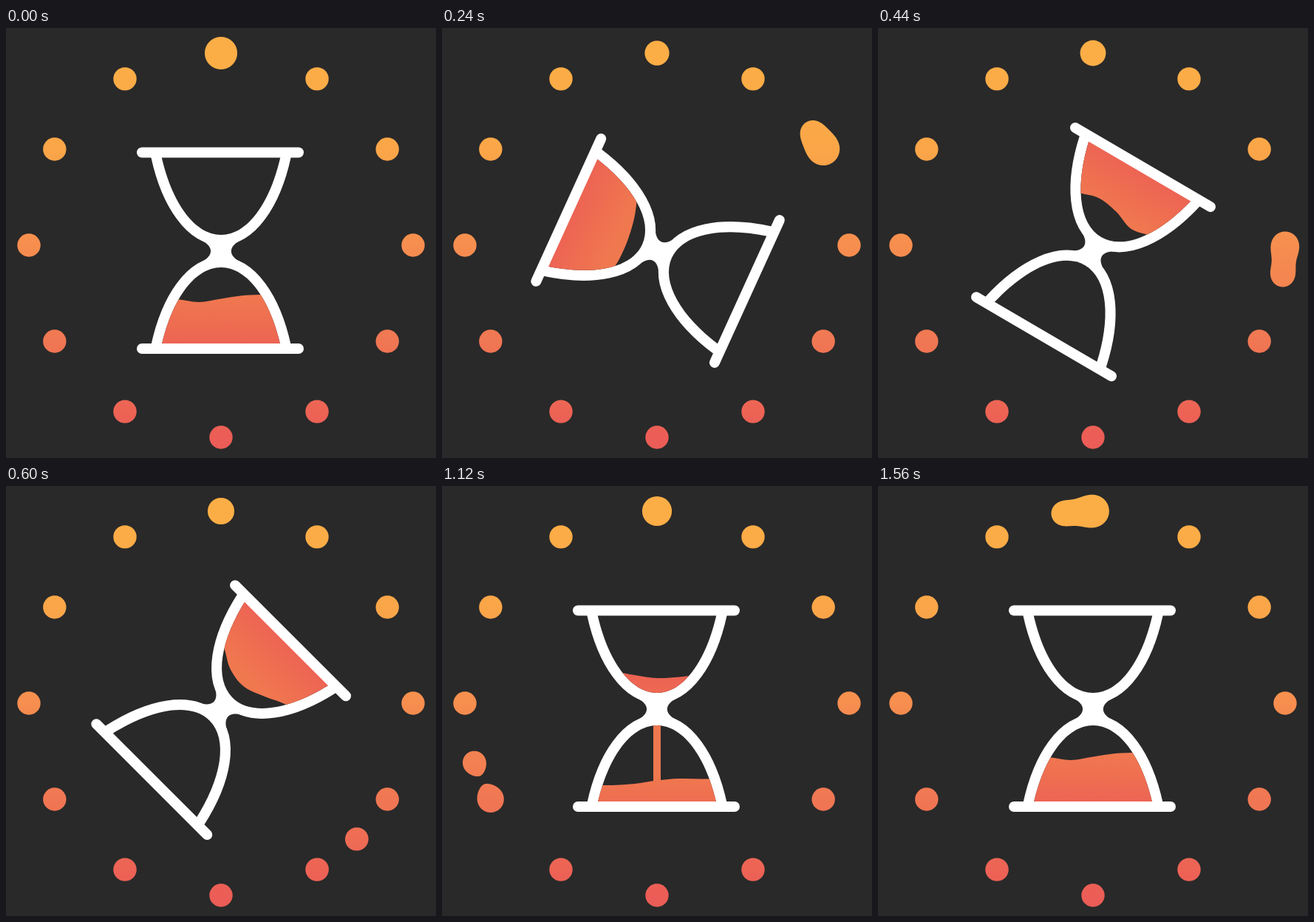
An HTML page with a canvas that plays this animation: 582 px wide and 582 px high, repeating every 1600 ms.

```html
<!DOCTYPE html>
<html lang="en">
<head>
<meta charset="utf-8">
<title>Hourglass loader</title>
<style>
  html, body { margin: 0; width: 100%; height: 100%; overflow: hidden; background: #292929; }
  canvas { display: block; width: 582px; height: 582px; }
</style>
</head>
<body>
<canvas id="stage" width="582" height="582"></canvas>
<script>
const ctx = document.getElementById('stage').getContext('2d');
const LOOP = 1600, TICK = 40, BG = '#292929', ORANGE = '#f0784f', RED = '#ed6453';
const RING = { x: 291, y: 294, r: 260 }, DOT = 15.7, STEP = LOOP / 12;
const GLASS = { x: 291, y: 302 };

// [time, angle, slope]
const SPIN = [
  [0, 0, 0], [240, 114.5, .56], [440, 210.3, .25], [560, 226, 0],
  [600, 225, -.08], [790, 180, 0], [LOOP + 1, 180, 0]
];

// Surface heights at x = -60, -30, 0, 30, 60
const SLOSH = [
  [0, 65, 69, 64.5, 60, 59],
  [240, 55, 47, 42.5, 42, 46],
  [440, 58, 52, 62, 66, 58],
  [600, 67, 54, 43.5, 47.5, 63],
  [800, 42, 31, 32, 40, 52],
  [880, 10, 10, 10, 10, 10]
];
const DRAIN = [
  [800, 132, 132, 132, 132, 132],
  [1120, 47, 43.5, 42, 46, 51],
  [1230, 20, 20, 20, 20, 20]
];
const RISE = [
  [890, 128, 129, 127, 126, 127],
  [1120, 103, 101, 96.5, 94, 94.5],
  [1400, 65, 69, 64.5, 60, 59]
];

// Dot radius around the runner's arrival
const PULSE = [[-45, DOT], [-27, 22], [0, 20], [53, 18], [66, DOT]];

function at(keys, t) {
  const last = keys[keys.length - 1];
  if (t <= keys[0][0]) return keys[0].slice(1);
  if (t >= last[0]) return last.slice(1);
  const i = keys.findIndex(k => k[0] > t), a = keys[i - 1], b = keys[i];
  const u = (t - a[0]) / (b[0] - a[0]);
  return a.slice(1).map((v, j) => v + (b[j + 1] - v) * u);
}

function spinAt(t) {
  const i = SPIN.findIndex(k => k[0] > t);
  const [t0, a, m] = SPIN[i - 1], [t1, b, n] = SPIN[i];
  const d = t1 - t0, u = (t - t0) / d, v = 1 - u;
  return a * (1 + 2 * u) * v * v + m * d * u * v * v + b * u * u * (3 - 2 * u) - n * d * u * u * v;
}

function vertical(y0, y1, stops) {
  const g = ctx.createLinearGradient(0, y0, 0, y1);
  stops.forEach(([p, c]) => g.addColorStop(p, c));
  return g;
}

const ringFill = vertical(34, 554, [
  [0, '#fcae46'], [.25, '#faa648'], [.5, '#f68e4f'], [.75, '#f07753'], [.933, '#ed6355'], [1, '#eb5d56']
]);

function onRing(deg) {
  const a = deg * Math.PI / 180;
  return { x: RING.x + RING.r * Math.sin(a), y: RING.y - RING.r * Math.cos(a) };
}

function disc(p, r) {
  ctx.beginPath();
  ctx.arc(p.x, p.y, r, 0, Math.PI * 2);
  ctx.fill();
}

// Two blobs as a gaussian field; its contour has a closed form along the axis
function goo(p, q, rp, rq) {
  const dx = q.x - p.x, dy = q.y - p.y, d = Math.hypot(dx, dy), a = Math.atan2(dy, dx);
  const c = Math.cos(a), s = Math.sin(a), k = 578;
  const n = Math.min(40, Math.max(1, 41 / (d + .01)));
  const field = (r, x) => Math.exp(n * (r * r - x * x) / k);
  let side = [];
  const flush = () => {
    if (side.length) {
      ctx.beginPath();
      side.forEach(([x, w]) => ctx.lineTo(p.x + x * c - w * s, p.y + x * s + w * c));
      side.reverse().forEach(([x, w]) => ctx.lineTo(p.x + x * c + w * s, p.y + x * s - w * c));
      ctx.fill();
    }
    side = [];
  };
  for (let x = -30; x < d + 30; x += .1) {
    const h = k / n * Math.log(field(rp, x) + field(rq, x - d));
    if (h > 0) side.push([x, Math.sqrt(h)]);
    else flush();
  }
  flush();
}

function drawRing(t) {
  ctx.fillStyle = ringFill;
  const near = Math.round(t / STEP) % 12;
  const topR = DOT + 6.3 * t / LOOP;
  for (let i = 0; i < 12; i++) if (i !== near) disc(onRing(i * 30), i ? DOT : topR);
  const r = near ? at(PULSE, t - near * STEP)[0] : topR;
  goo(onRing(t / LOOP * 360), onRing(near * 30), DOT, r);
}

// Inner outline of a bulb: dir 1 below the neck, -1 above
function bulb(dir) {
  ctx.beginPath();
  ctx.moveTo(-81, 130 * dir);
  ctx.bezierCurveTo(-67, 66 * dir, -36, 22 * dir, 0, 22 * dir);
  ctx.bezierCurveTo(36, 22 * dir, 67, 66 * dir, 81, 130 * dir);
}

function inGlass(deg, draw) {
  ctx.save();
  ctx.translate(GLASS.x, GLASS.y);
  ctx.rotate(deg * Math.PI / 180);
  draw();
  ctx.restore();
}

function drawBulbs() {
  ctx.strokeStyle = ctx.fillStyle = '#fff';
  ctx.lineWidth = 28;
  ctx.lineCap = 'butt';
  for (const dir of [-1, 1]) { bulb(dir); ctx.stroke(); }
  ctx.beginPath();
  ctx.moveTo(-27, -15);
  ctx.bezierCurveTo(-9.5, -6.3, -9.5, 6.3, -27, 15);
  ctx.lineTo(27, 15);
  ctx.bezierCurveTo(9.5, 6.3, 9.5, -6.3, 27, -15);
  ctx.fill();
  ctx.fillStyle = BG;
  for (const dir of [-1, 1]) { bulb(dir); ctx.fill(); }
}

function drawBars() {
  ctx.strokeStyle = '#fff';
  ctx.lineWidth = 14;
  ctx.lineCap = 'round';
  for (const y of [-133.5, 132]) {
    ctx.beginPath();
    ctx.moveTo(-107, y);
    ctx.lineTo(105, y);
    ctx.stroke();
  }
}

// Smooth line through five heights
function surface(h) {
  const p = [h[0], ...h, h[4]].map((y, i) => [i * 30 - 90, y]);
  ctx.lineTo(...p[0]);
  ctx.lineTo(...p[1]);
  for (let i = 1; i < 6; i++) {
    const [x0, y0] = p[i], [x1, y1] = p[i + 1], before = p[i - 1][1];
    const after = (p[i + 2] || p[i + 1])[1];
    ctx.bezierCurveTo(x0 + 10, y0 + (y1 - before) / 6, x1 - 10, y1 - (after - y0) / 6, x1, y1);
  }
}

function sand(front, tail, y0, y1) {
  bulb(1);
  ctx.clip();
  ctx.fillStyle = vertical(y0, y1, [[0, ORANGE], [1, RED]]);
  // Fill below the front, cut off by the tail
  ctx.beginPath();
  ctx.moveTo(-95, -10);
  surface(tail);
  ctx.lineTo(95, -10);
  ctx.clip();
  ctx.beginPath();
  ctx.moveTo(-95, 140);
  surface(front);
  ctx.lineTo(95, 140);
  ctx.fill();
}

function drawStream(t) {
  const tip = Math.min(130, 24 + (t - 800) * 1.05);
  const top = 10 + Math.max(0, t - 1215) * 1.05;
  if (tip < 18 || top > 110) return;
  bulb(1);
  ctx.clip();
  ctx.strokeStyle = ORANGE;
  ctx.lineWidth = 10;
  ctx.lineCap = 'round';
  ctx.beginPath();
  ctx.moveTo(0, top);
  ctx.lineTo(0, Math.max(top, tip));
  ctx.stroke();
}

function drawGlass(t) {
  const spin = spinAt(t), pose = t < 1120 ? spin : 0;
  inGlass(pose, drawBulbs);
  const flow = Math.max(0, t - 800) * .27;
  if (t < 1240) inGlass(spin, () => sand(at(SLOSH, t), at(DRAIN, t), 55 - flow, 125 - flow));
  if (t > 780) {
    inGlass(0, () => drawStream(t));
    const level = at(RISE, t);
    inGlass(0, () => sand(level, [140, 140, 140, 140, 140], level[2] - 5, level[2] + 62));
  }
  inGlass(pose, drawBars);
}

// The motion advances in ticks; a loop closes on its end pose
function frame() {
  const t = Math.floor((performance.now() + 1) / TICK) * TICK % LOOP || LOOP;
  ctx.fillStyle = BG;
  ctx.fillRect(0, 0, 582, 582);
  drawRing(t);
  drawGlass(t);
  requestAnimationFrame(frame);
}
frame();
</script>
</body>
</html>
```
